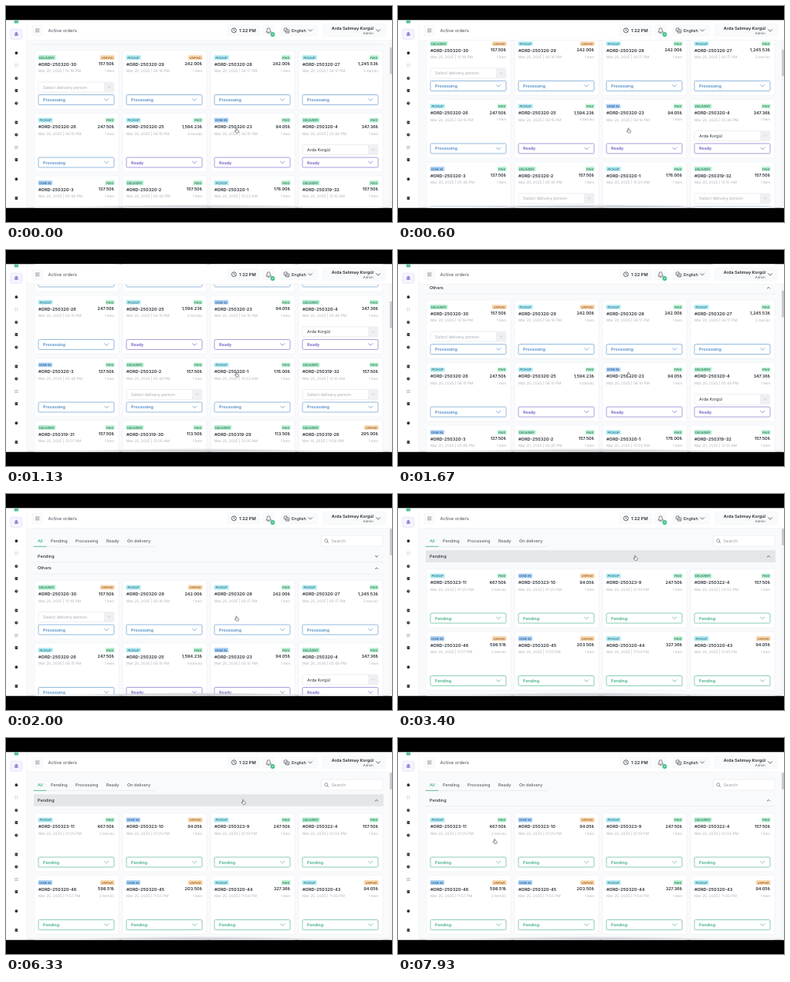
Write an HTML page that moves like this. It is 500 px wide and 281 px high and loops after 8 s.

```html
<!DOCTYPE html>
<html lang="en">
<head>
<meta charset="utf-8">
<title>Active orders</title>
<style>
  html, body { margin: 0; width: 100%; height: 100%; overflow: hidden; background: #000; }
  svg { display: block; width: 100vw; height: 100vh; }
  text { font-family: Inter, "Noto Sans", sans-serif; text-rendering: geometricPrecision; }
</style>
</head>
<body>
<svg id="stage" viewBox="0 0 500 281"></svg>
<script>
const LOOP = 8000;
const ROW = 81.5, COLUMN = 114, PANEL = 800;
const INK = '#2a2e36', MUTED = '#adb1b9', LINE = '#e8eaee';
const GREEN = '#3fae80', BLUE = '#4a8ac6', PURPLE = '#7459c6';
const BADGE = {
  DELIVERY: [22.5, '#b0ebce', '#2b7a5b'],
  PICKUP: [19, '#b2ebf3', '#2a6f80'],
  'DINE IN': [18.5, '#aed3f7', '#2a5c8c'],
  PAID: [11.8, '#bcf1d4', '#2b7a5b'],
  UNPAID: [18.8, '#fbd9b0', '#96602c']
};
const STATUS = { Processing: BLUE, Ready: PURPLE, Pending: GREEN };
const PERSON = 'Select delivery person', COURIER = 'Arda Korgül';

// type | number | price | payment | date | time | items | status | delivery person
const OTHERS = `
DELIVERY|250320-30|157.50|UNPAID|20|10:18 PM|1|Processing|${PERSON}
PICKUP|250320-29|242.00|UNPAID|20|06:18 PM|1|Processing
PICKUP|250320-28|242.00|PAID|20|06:17 PM|1|Processing
PICKUP|250320-27|1,245.53|PAID|20|06:17 PM|2|Processing
PICKUP|250320-26|247.50|PAID|20|06:15 PM|1|Processing
PICKUP|250320-25|1,594.23|PAID|20|06:15 PM|4|Ready
DINE IN|250320-23|94.05|PAID|20|06:10 PM|1|Ready
DELIVERY|250320-4|347.36|PAID|20|05:49 PM|1|Ready|${COURIER}
DINE IN|250320-3|137.50|PAID|20|05:48 PM|1|Processing
DELIVERY|250320-2|157.50|PAID|20|05:45 PM|1|Processing|${PERSON}
PICKUP|250320-1|176.00|PAID|20|10:23 AM|1|Processing
DELIVERY|250319-32|157.50|PAID|20|12:15 AM|1|Processing|${PERSON}
DELIVERY|250319-31|157.50|PAID|20|12:07 AM|1|Processing|${PERSON}
DELIVERY|250319-30|113.50|PAID|20|12:05 AM|1|Processing|${PERSON}
DELIVERY|250319-29|113.50|PAID|20|12:05 AM|1|Processing|${PERSON}
DELIVERY|250319-26|295.00|UNPAID|16|11:56 PM|1|Processing|${PERSON}`;
const PENDING = `
PICKUP|250323-11|467.50|PAID|23|01:20 PM|2|Pending
DINE IN|250323-10|94.05|UNPAID|23|01:20 PM|1|Pending
PICKUP|250323-9|247.50|PAID|23|01:19 PM|1|Pending
DELIVERY|250322-4|157.50|PAID|23|03:03 PM|1|Pending
DINE IN|250320-46|598.51|UNPAID|20|11:57 PM|2|Pending
DINE IN|250320-45|203.50|UNPAID|20|11:55 PM|1|Pending
PICKUP|250320-44|327.36|PAID|20|11:54 PM|1|Pending
PICKUP|250320-43|94.05|UNPAID|20|11:45 PM|1|Pending`;

const text = (x, y, size, str, fill = INK, weight = 400, anchor = 'start') =>
  `<text x="${x}" y="${y + size * 0.36}" font-size="${size}" fill="${fill}" font-weight="${weight}" text-anchor="${anchor}">${str}</text>`;
const rect = (x, y, w, h, fill, stroke = 'none', r = 0, sw = 0.6) =>
  `<rect x="${x}" y="${y}" width="${w}" height="${h}" rx="${r}" fill="${fill}" stroke="${stroke}" stroke-width="${sw}"/>`;
const path = (d, stroke = INK, sw = 0.7, fill = 'none') =>
  `<path d="${d}" fill="${fill}" stroke="${stroke}" stroke-width="${sw}" stroke-linecap="round" stroke-linejoin="round"/>`;
const circle = (x, y, r, fill, stroke = 'none', sw = 0.8) =>
  `<circle cx="${x}" cy="${y}" r="${r}" fill="${fill}" stroke="${stroke}" stroke-width="${sw}"/>`;
const chevron = (x, y, color = INK, w = 2.6, dir = 1) =>
  path(`M${x - w} ${y - w * 0.5 * dir}L${x} ${y + w * 0.5 * dir}L${x + w} ${y - w * 0.5 * dir}`, color);

function badge(x, label, alignRight) {
  const [w, fill, ink] = BADGE[label];
  const left = alignRight ? x - w : x;
  return rect(left, 6.1, w, 5.8, fill, 'none', 1) + text(left + w / 2, 9.1, 4.15, label, ink, 500, 'middle');
}

function card(line, index) {
  const [type, id, price, paid, day, time, items, status, person] = line.split('|');
  const color = STATUS[status];
  let out = rect(0, 0, 109, 76.5, '#fff', '#eff0f3', 2)
    + badge(4.6, type) + badge(103.6, paid, true)
    + text(5, 17.6, 5.6, '#ORD-' + id, INK, 600)
    + text(103.2, 17.4, 5.5, price + '₺', INK, 600, 'end')
    + text(5, 26.6, 4.8, `Mar ${day}, 2025 | ${time}`, MUTED)
    + text(103.2, 26.4, 4.6, items > 1 ? items + ' item(s)' : '1 item', MUTED, 400, 'end');
  if (person) {
    out += rect(5, 41, 98, 13, '#fff', '#e0e2e7', 1.5)
      + rect(90, 41.3, 12.7, 12.4, '#eff0f3', 'none', 1)
      + chevron(96.5, 47.5, '#bcc0c7', 1.7)
      + text(11, 47.6, 5.4, person, person === PERSON ? '#a4a8b0' : INK);
  }
  out += rect(5, 57.5, 98, 13, '#fff', color, 1.5, 0.6)
    + text(11, 64.1, 5.35, status, color, 600) + chevron(93.2, 64, color);
  return `<g transform="translate(${37 + (index % 4) * COLUMN} ${Math.floor(index / 4) * ROW})">${out}</g>`;
}
const cards = list => list.trim().split('\n').map(card).join('');

function sideIcon(y, i) {
  const x = 13.4;
  const shapes = [
    () => rect(x - 1.8, y - 1.8, 3.6, 3.8, INK, 'none', 1.5),
    () => [-1.3, 1.3].map(d => circle(x + d, y - 1.3, 0.5, '#6d727b') + circle(x + d, y + 1.3, 0.5, '#6d727b')).join(''),
    () => circle(x, y, 2, INK) + path(`M${x} ${y - 1}v1h1`, '#fff', 0.4),
    () => rect(x - 1.8, y - 2, 3.6, 4, INK, 'none', 0.7) + path(`M${x - 0.9} ${y}h1.8`, '#fff', 0.4),
    () => path(`M${x - 2} ${y - 1.4}h4M${x - 2} ${y}h4M${x - 2} ${y + 1.4}h4`, '#858a93', 0.5)
  ];
  return shapes[i]();
}

function sidebar() {
  const ys = [61, 77, 94, 110, 126.5, 151.5, 167.5, 184, 200, 225, 250];
  const kinds = [0, 1, 2, 3, 2, 3, 2, 4, 3, 0, 3];
  return rect(0, 18, 27, 245, '#fff') + path('M27 18V263', LINE, 0.5)
    + rect(10.6, 18, 5.6, 4.6, '#58c294', 'none', 1)
    + rect(5.7, 30, 15.3, 13.5, '#f6f4fd', '#d9d3f5', 2.5, 0.5)
    + path('M11.2 38.2h4.4M11.9 37.6v-1.6a1.5 1.8 0 0 1 3 0v1.6z', '#7c63cb', 0.7, '#9c8ae0')
    + ys.map((y, i) => sideIcon(y, kinds[i])).join('');
}

function header() {
  const button = (x, y, w, h) => rect(x, y, w, h, '#f9fafb', '#f3f4f6', 2, 0.5);
  return rect(27, 18, 473, 26.5, '#fff') + path('M27 44.5H500', LINE, 0.5)
    + button(33.5, 25, 14, 14)
    + path('M38.4 29.9h4.6M38.4 31.8h4.6M38.4 33.7h4.6', '#5d626b', 0.6)
    + text(54.5, 31.8, 5.95, 'Active orders', '#4a4f59')
    + button(287, 24.5, 42, 14.5)
    + circle(295.3, 31.7, 3, 'none', INK, 0.7) + path('M295.3 30v1.9l1.2.7', INK, 0.6)
    + text(302, 31.7, 5.7, '1:22 PM', INK, 600)
    + button(332.5, 24.5, 15.5, 14.5)
    + path('M337.2 33.8q1-1 1-3a2 2.2 0 0 1 4 0q0 2 1 3zM339.4 35.3h1.6', INK, 0.6)
    + circle(345.4, 37, 2.9, '#3fbf86') + text(345.4, 37, 3, '41', '#fff', 500, 'middle')
    + button(356, 24.5, 48, 14.5)
    + rect(360.2, 28.8, 4, 4, 'none', INK, 0.7, 0.6) + rect(362.4, 30.8, 4.4, 4.2, '#f9fafb', INK, 0.7, 0.6)
    + path('M363.6 34l1-2 1 2', INK, 0.5)
    + text(370, 31.7, 5.4, 'English', INK, 500) + chevron(394.2, 31.8, INK, 2.4)
    + button(410, 23, 82, 17)
    + text(476, 29, 5.55, 'Arda Selimay Korgül', INK, 600, 'end')
    + text(476, 35, 4.5, 'Admin', '#5d626b', 400, 'end') + chevron(482, 31.8, INK, 2.4);
}

function tabs() {
  const items = [[58, 'Pending'], [90, 'Processing'], [130, 'Ready'], [157, 'On delivery']];
  return path('M36 68.5H193', '#e3e5ea', 0.6) + path('M36 68.3H52', GREEN, 0.8)
    + text(41, 60.7, 5.5, 'All', GREEN, 500)
    + items.map(([x, label]) => text(x, 60.7, 5.5, label, '#5d626b', 500)).join('')
    + rect(408, 54, 80, 14, '#fff', '#e6e8ec', 2)
    + circle(414.8, 60.6, 2, 'none', '#5d626b', 0.6) + path('M416.3 62.2l1.5 1.5', '#5d626b', 0.6)
    + text(421.5, 61, 5.6, 'Search', '#9a9ea7');
}

const HAND = 'M-1.5 .8V-3.1a.8.8 0 0 1 1.6 0V-.9l2.3.6q1 .3.8 1.4L2.6 3.8H-1L-3.2 1.2q-.4-.9.5-1z';

document.getElementById('stage').innerHTML = `
  <defs>
    <clipPath id="screen"><rect x="0" y="18.6" width="500" height="243.8"/></clipPath>
    <clipPath id="panelClip"><rect id="panelMask" x="27" y="88.5" width="470" height="0"/></clipPath>
    <radialGradient id="shade">
      <stop offset="0" stop-color="#b9bbc0" stop-opacity=".8"/>
      <stop offset=".7" stop-color="#c9cbcf" stop-opacity=".5"/>
      <stop offset="1" stop-color="#d5d6da" stop-opacity="0"/>
    </radialGradient>
  </defs>
  ${rect(0, 0, 500, 281, '#000')}
  <g clip-path="url(#screen)">
    ${rect(0, 18, 500, 245, '#f9fafc')}
    <g id="page">
      ${tabs()}
      <rect id="hover" x="36" y="73.3" width="453" height="15.2" fill="#e5e6e9"/>
      ${path('M36 88.7H489', '#e3e5e9', 0.5)}
      ${text(41, 81, 5.5, 'Pending', INK, 500)}
      <g id="arrow">${chevron(0, 0, INK, 1.7)}</g>
      <g clip-path="url(#panelClip)">
        <g transform="translate(0 97.5)">${cards(PENDING)}
          ${[0, 1, 2, 3].map(i => rect(37 + i * COLUMN, ROW * 2, 109, 76.5, '#fff', '#eff0f3', 2)).join('')}
        </g>
      </g>
      <g id="others">
        ${text(41, 96.2, 5.5, 'Others', INK, 500)}${chevron(480, 96.6, INK, 1.7, -1)}
        ${path('M36 104.2H489', '#e3e5e9', 0.5)}
        <g transform="translate(0 112.5)">${cards(OTHERS)}</g>
      </g>
    </g>
    <rect x="27" y="260.3" width="473" height="3" fill="#f1f2f4" opacity=".85"/>
    <ellipse cx="250" cy="262.5" rx="170" ry="4.5" fill="url(#shade)"/>
    ${rect(496.6, 44.5, 3.4, 218.5, '#f6f6f8')}
    <rect id="thumb" x="497.2" width="2.8" rx="1.2" fill="#c8c9cd"/>
    ${header()}${sidebar()}
    <circle id="ring" r="10.4" fill="#fff" fill-opacity=".15" stroke="#50535a" stroke-width=".8"/>
    <g id="cursor">${path(HAND, '#3b3f46', 0.7, '#fff')}</g>
  </g>`;

const el = id => document.getElementById(id);
const set = (id, attrs) => { for (const k in attrs) el(id).setAttribute(k, attrs[k]); };
const ramp = (t, a, b) => Math.min(1, Math.max(0, (t - a) / (b - a)));
const ease = p => p * p * (3 - 2 * p);
const mix = (a, b, p) => a + (b - a) * p;

const SCROLL = [[0, 54.5], [70, 54.5], [600, 72.5], [1130, 135], [1270, 139], [1930, 0]];

// Cubic through the points, flat wherever the direction turns
function scrollAt(t) {
  const n = SCROLL.length;
  if (t >= SCROLL[n - 1][0]) return 0;
  const slope = i => {
    if (i === 0 || i === n - 1) return 0;
    const [a, b, c] = SCROLL.slice(i - 1, i + 2);
    const before = (b[1] - a[1]) / (b[0] - a[0]), after = (c[1] - b[1]) / (c[0] - b[0]);
    return before * after <= 0 ? 0 : 2 * before * after / (before + after);
  };
  const i = SCROLL.findIndex((p, k) => t < SCROLL[k + 1][0]);
  const [t0, s0] = SCROLL[i], [t1, s1] = SCROLL[i + 1];
  const d = t1 - t0, p = (t - t0) / d, q = 1 - p;
  return s0 * (1 + 2 * p) * q * q + s1 * p * p * (3 - 2 * p)
    + d * p * q * (slope(i) * q - slope(i + 1) * p);
}

function ringOpacity(t) {
  const click = (start, hold, fade) => t < start ? 0 : 1 - ramp(t, start + hold, start + hold + fade);
  return Math.max(click(2800, 130, 200), click(4800, 195, 205));
}

function render(t) {
  const scroll = scrollAt(t);
  const open = ease(ramp(t, 2930, 3270));
  const panel = PANEL * open;
  const toHeader = ease(ramp(t, 2130, 2700)), away = ease(ramp(t, 7480, 7930));
  const x = mix(mix(299, 307.7, toHeader), 125.7, away);
  const y = mix(mix(162, 83.2, toHeader), 134.5, away);
  const view = 217.5, content = 1358 + panel;

  set('page', { transform: `translate(0 ${-scroll})` });
  set('panelMask', { height: panel });
  set('others', { transform: `translate(0 ${panel})` });
  set('arrow', { transform: `translate(480 81.2) scale(1 ${1 - 2 * open})` });
  set('hover', { opacity: y > 73 && y < 89 ? 1 : 0 });
  set('thumb', { y: 45 + scroll * view / content, height: view * view / content });
  set('cursor', { transform: `translate(${x} ${y}) scale(.8)` });
  set('ring', { cx: x - 0.9, cy: y - 3.1, opacity: ringOpacity(t) });
}

const start = performance.now();
function tick() {
  render((performance.now() - start) % LOOP);
  requestAnimationFrame(tick);
}
tick();
</script>
</body>
</html>
```
